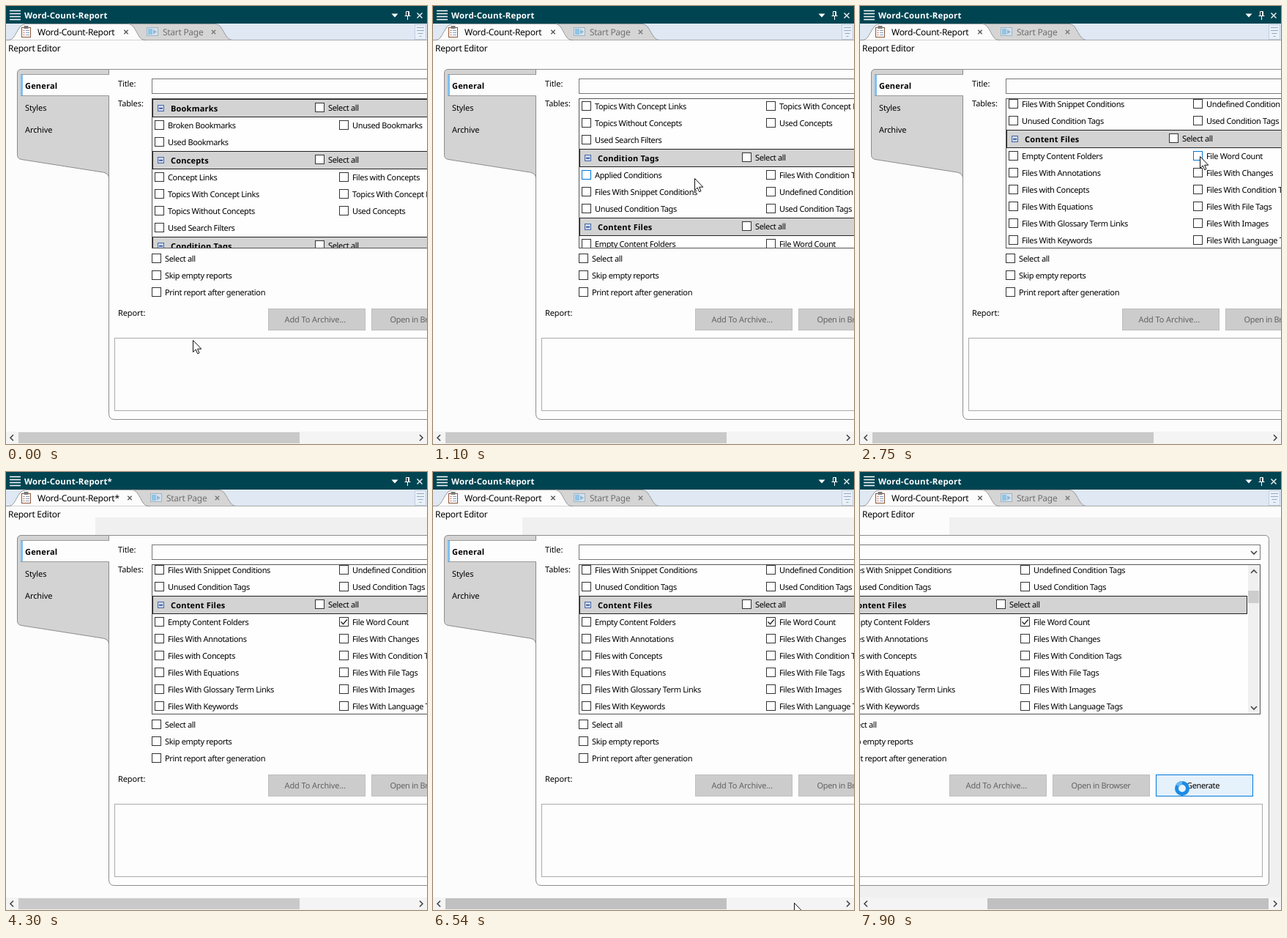
These frames come from a looping animation (575 by 598 pixels, 8 s). An HTML page:

```html
<!DOCTYPE html>
<html lang="en">
<head>
<meta charset="utf-8">
<title>Report Editor</title>
<style>
  html, body { margin: 0; width: 100%; height: 100%; overflow: hidden; background: #fcfcfc; }
  svg { display: block; }
  text { font: 11px "Noto Sans", "Open Sans", sans-serif; letter-spacing: -.35px; fill: #000;
         text-rendering: geometricPrecision; white-space: pre; }
  .label { letter-spacing: -.1px; }
  .bold { font-weight: 700; letter-spacing: .2px; }
  .caption { font-size: 11.4px; fill: #fff; }
  .tab { font-size: 12px; letter-spacing: -.28px; }
  .dim { fill: #707070; }
  .off { fill: #626262; }
  .check rect { fill: #fff; stroke: #333; }
  .check path { fill: none; stroke: #222; stroke-width: 1.3; visibility: hidden; }
  .check.hover rect { stroke: #0078d7; }
  .check.pressed rect { fill: #cce4f7; stroke: #005499; }
  .check.on path { visibility: visible; }
  #generate rect { fill: #e1e1e1; stroke: #adadad; }
  #generate.hover rect { fill: #e5f1fb; stroke: #0078d7; }
</style>
</head>
<body>
<svg id="stage" width="575" height="598" viewBox="0 0 575 598"></svg>
<script>
const LOOP = 8000, PAN = 236;
const stage = document.getElementById('stage');
const hits = [];

const text = (x, y, s, cls = '') => `<text x="${x}" y="${y}" class="${cls}">${s}</text>`;
const rect = (x, y, w, h, fill, extra = '') =>
  `<rect x="${x}" y="${y}" width="${w}" height="${h}" fill="${fill}" ${extra}/>`;
const frame = (x, y, w, h, fill, stroke) =>
  rect(x + .5, y + .5, w - 1, h - 1, fill, `stroke="${stroke}"`);
const line = (d, color, width = 1) =>
  `<path d="${d}" fill="none" stroke="${color}" stroke-width="${width}"/>`;
const cross = (x, y, r, color) =>
  line(`M${x - r} ${y - r}l${2 * r} ${2 * r}m0 ${-2 * r}l${-2 * r} ${2 * r}`, color, 1.3);
const arrow = (x, y, dx, dy) =>   // chevron pointing along dx, dy
  line(`M${x - 2 * dx - 4 * dy} ${y - 2 * dy - 4 * dx}L${x + 2 * dx} ${y + 2 * dy}L${x - 2 * dx + 4 * dy} ${y - 2 * dy + 4 * dx}`, '#444', 1.6);

// A check box; w is the width of the area that reacts to the pointer.
function check(id, x, y, label, w, inList = true) {
  hits.push({ id, x, y, w, inList });
  return `<g id="${id}" class="check"><rect x="${x + .5}" y="${y - 6.5}" width="12" height="12"/>
    <path d="M${x + 2.5} ${y - .5}l3 3.2l5.2 -6.2"/></g>` + text(x + 18, y + 4, label);
}

const GROUPS = [
  ['Bookmarks', 'Broken Bookmarks', 'Unused Bookmarks', 'Used Bookmarks'],
  ['Concepts', 'Concept Links', 'Files with Concepts', 'Topics With Concept Links',
    'Topics With Concept Links', 'Topics Without Concepts', 'Used Concepts', 'Used Search Filters'],
  ['Condition Tags', 'Applied Conditions', 'Files With Condition Tags', 'Files With Snippet Conditions',
    'Undefined Condition Tags', 'Unused Condition Tags', 'Used Condition Tags'],
  ['Content Files', 'Empty Content Folders', 'File Word Count', 'Files With Annotations',
    'Files With Changes', 'Files with Concepts', 'Files With Condition Tags', 'Files With Equations',
    'Files With File Tags', 'Files With Glossary Term Links', 'Files With Images',
    'Files With Keywords', 'Files With Language Tags']
];

function list() {
  let y = 139, out = '';
  GROUPS.forEach(([name, ...items], g) => {
    out += frame(200, y - 12, 565, 25, '#d3d3d3', '#222')
      + frame(207, y - 4, 9, 9, '#c9d6ef', '#4a6aa5') + rect(209, y, 5, 1.4, '#1f3f8a')
      + text(225, y + 5, name, 'bold')
      + check('all' + g, 422, y, 'Select all', 62);
    y += 24;
    items.forEach((item, i) => {
      const right = i % 2;
      out += check(`c${g}-${i}`, right ? 455 : 203, y, item, right ? 300 : 247);
      if (right || i === items.length - 1) y += 23;
    });
    y += 1;
  });
  return out;
}

const button = (x, label, textX, cls) =>
  frame(x, 413, 133, 30, '#ccc', '#bfbfbf') + text(textX, 432, label, cls);

const panel = `
  <path d="M20.5 86.5H789q5.500 0 5.500 6V559q0 5.500 -5.500 5.500H148q-7.500 0 -7.500 -8V86.500z" fill="#fdfdfd" stroke="#8c8c8c"/>
  <path d="M140.500 235q0 -6.500 -8 -8L21 209.500q-5.500 -1 -5.500 -6V92q0 -5.500 5.500 -5.500H140.500z" fill="#d3d3d3" stroke="#8c8c8c"/>
  ${rect(20, 93, 122, 30, '#fdfdfd')}${line('M20 93.500H141M20 122.500H141', '#999')}
  ${rect(20, 94, 3, 28, '#7fc0f2')}
  ${text(26, 113, 'General', 'bold')}${text(26, 143, 'Styles', 'label')}${text(26, 173, 'Archive', 'label')}
  ${text(153, 110, 'Title:', 'label')}${text(153, 137, 'Tables:', 'label')}${text(153, 423, 'Report:', 'label')}
  ${frame(199, 99, 584, 21, '#fdfdfd', '#777')}${arrow(774, 110, 0, 1)}
  ${frame(199, 126, 584, 205, '#fefefe', '#555')}
  <svg x="200" y="127" width="582" height="203" viewBox="200 127 582 203"><g id="rows">${list()}</g></svg>
  ${rect(766, 127, 16, 203, '#f0f0f0')}${rect(766, 162, 15, 17, '#cdcdcd')}
  ${arrow(774, 136, 0, -1)}${arrow(774, 322, 0, 1)}
  ${check('every', 199, 345, 'Select all', 60, false)}
  ${check('skip', 199, 368, 'Skip empty reports', 109, false)}
  ${check('print', 199, 391, 'Print report after generation', 156, false)}
  ${button(358, 'Add To Archive...', 380.5, 'off label')}${button(499, 'Open in Browser', 524.5, 'off')}
  <g id="generate"><rect x="640.5" y="413.5" width="132" height="29"/>${text(682, 432, 'Generate')}</g>
  ${frame(148, 453, 638, 100, '#fdfdfd', '#aaa')}`;

const clipboard = frame(21, 29, 13, 14, '#fff', '#8a5638') + rect(24.5, 27, 6, 4, '#7c7c7c')
  + line('M23.500 33.500h2M23.500 36.500h2M23.500 39.500h2', '#d0604c')
  + line('M27 33.500h5M27 36.500h5M27 39.500h5', '#7f9cc0');

const chrome = `
  ${rect(0, 0, 575, 24, '#004452')}
  ${line('M5 6.500H20M5 10.500H20M5 14.500H20M5 18.500H20', '#fff', 1.4)}
  ${text(25, 17, 'Word-Count-Report<tspan class="star">*</tspan>', 'bold caption')}
  <path d="M526.500 10.500h9l-4.500 5z" fill="#fff"/>
  ${line('M546.500 7.500h4v6h-4zM544.500 13.500h8M548.500 14v5', '#fff')}${rect(549, 8, 1.6, 6, '#fff')}
  ${cross(565, 13, 3.5, '#fff')}
  ${rect(0, 24, 575, 23, '#dfe8f3')}
  <g class="shift">
    <path d="M170 46.500V24.500H286c11 0 12 22 23 22z" fill="#d5d5d5" stroke="#999"/>
    ${frame(192, 29, 16, 12, '#d3e2ee', '#a3b3c0')}${rect(194, 31, 6, 8, '#8fc4e6')}
    <path d="M201 32l5 3.200l-5 3.200z" fill="#94b6d0"/>
    ${text(214, 40, 'Start Page', 'tab dim')}${cross(283.5, 35.5, 2.7, '#777')}
  </g>
  ${line('M0 46.500H575', '#aaa')}
  <path id="front" fill="#fcfcfc" stroke="#999"/>
  ${clipboard}
  ${text(43, 40, 'Word-Count-Report<tspan class="star">*</tspan>', 'tab')}
  <g class="shift">${cross(164, 35.5, 2.7, '#555')}</g>
  ${frame(558, 25, 16, 21, '#e9f0f8', '#c3cfde')}
  ${line('M561 29.500h10M561 33.500h10M562.500 37.500h7M564.500 41.500h3', '#93a9c6')}
  ${text(3, 62, 'Report Editor', 'tab')}
  ${rect(0, 581, 575, 17, '#f4f4f4')}
  <rect id="thumb" y="582" width="384" height="15"/>
  ${arrow(8, 589.5, -1, 0)}${arrow(567, 589.5, 1, 0)}`;

stage.innerHTML = `${rect(0, 0, 575, 598, '#fcfcfc')}
  ${rect(122, 62, 453, 25, '#f0f0f0', 'id="band"')}${rect(0, 87, 575, 494, '#f0f0f0', 'id="margin"')}
  <g id="panel">${panel}</g>${chrome}
  <path id="pointer" d="M.5 .5V16.500L4.200 13L6.700 18.700L9 17.700L6.600 12.200H11.800z" fill="#fff" stroke="#111"/>
  <g id="busy"><circle cx="440" cy="432" r="7.5" fill="#e9f4fc" stroke="#1c8be6" stroke-width="5"/>
  ${line('M433.500 428.200a7.500 7.500 0 0 1 6.500 -3.700', '#69b8f3', 5)}</g>`;

const el = id => document.getElementById(id);
const show = (node, on) => node.setAttribute('visibility', on ? 'visible' : 'hidden');

// Pointer moves: first step, last step, step count, from, to, sag
const MOVES = [
  [280, 790, 5, 255, 456, 357, 235, 0],
  [1780, 2750, 8, 357, 235, 464, 205, 18],
  [3030, 4020, 7, 464, 205, 457, 208, 0],
  [4170, 4170, 1, 457, 208, 125, 64, 0],
  [5660, 6540, 7, 110, 30, 493, 588, 0],
  [6660, 6660, 1, 493, 588, 494, 589, 0],
  [6810, 7470, 6, 494, 589, 440, 432, 0]
];

function pointerAt(t) {
  let pos = [255, 456];
  for (const [a, b, n, x0, y0, x1, y1, sag] of MOVES) {
    if (t < a) break;
    const gap = n > 1 ? (b - a) / (n - 1) : 1;
    const k = Math.min(n, Math.floor((t - a) / gap + 1e-6) + 1) / n;
    const p = n > 1 ? k * k * (3 - 2 * k) : 1;
    pos = [x0 + (x1 - x0) * p, y0 + (y1 - y0) * p + sag * Math.sin(Math.PI * p)];
  }
  return pos.map(Math.round);
}

function draw(t) {
  const [px, py] = pointerAt(t);
  const away = t >= 4300 && t < 5660;
  const scroll = t < 1100 ? 0 : t < 1510 ? 120 : 240;
  const pan = t < 6660 ? 0 : PAN;
  const edited = t >= 3170 && t < 5660;

  el('panel').setAttribute('transform', `translate(${-pan} 0)`);
  el('rows').setAttribute('transform', `translate(0 ${-scroll})`);
  show(el('band'), t >= 4170);
  show(el('margin'), pan > 0);
  el('thumb').setAttribute('x', pan ? 174 : 17);
  el('thumb').setAttribute('fill', t < 6540 ? '#c9c9c9' : '#c0c0c0');

  const end = edited ? 5 : 0;
  el('front').setAttribute('d',
    `M0 46.500H4c10 0 11 -22 23 -22H${167 + end}c11 0 12 22 22 22H${192 + end}`);
  document.querySelectorAll('.shift').forEach(g => g.setAttribute('transform', `translate(${end} 0)`));
  document.querySelectorAll('.star').forEach(s => show(s, edited));

  const wx = px + pan;
  for (const { id, x, y, w, inList } of hits) {
    const inside = inList ? py > 126 && py < 330 : true;
    const dy = py - (inList ? y - scroll : y);
    const over = !away && inside && wx >= x && wx < x + w && dy >= -11 && dy < 12;
    el(id).classList.toggle('hover', over);
  }
  el('c3-1').classList.toggle('pressed', t >= 3030 && t < 3170);
  el('c3-1').classList.toggle('on', t >= 3170);
  el('generate').classList.toggle('hover', wx >= 640 && wx < 773 && py >= 413 && py < 443);

  el('pointer').setAttribute('transform', `translate(${px} ${py})`);
  show(el('pointer'), !away && t < 7900);
  show(el('busy'), t >= 7900);
}

const start = performance.now();
function tick() {
  draw((performance.now() - start) % LOOP);
  requestAnimationFrame(tick);
}
tick();
</script>
</body>
</html>
```
